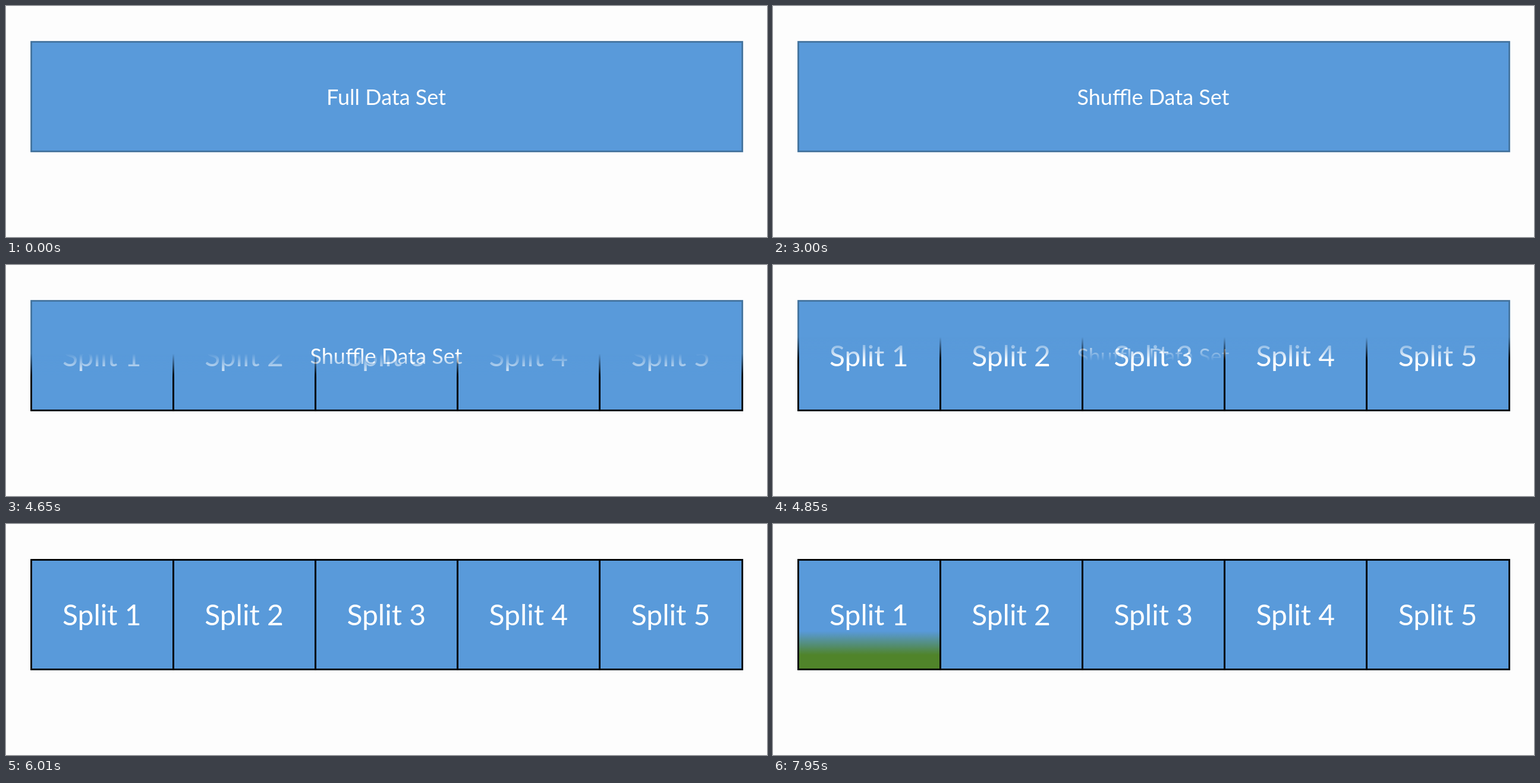
Write an HTML page that moves like this. It is 1280 px wide and 390 px high and loops after 7.99 s.

```html
<!DOCTYPE html>
<html lang="en">
<head>
<meta charset="utf-8">
<title>Splitting a data set</title>
<style>
  html, body { margin: 0; width: 100%; height: 100%; overflow: hidden; background: #fdfdfd; }
  svg { display: block; width: 100%; height: 100%; }
  text { font-family: Lato, "Open Sans", sans-serif; fill: #fff; text-anchor: middle; }
</style>
</head>
<body>
<svg viewBox="0 0 1280 390">
  <defs>
    <linearGradient id="splitFade" gradientUnits="userSpaceOnUse" x1="0" x2="0">
      <stop offset="0" stop-color="#000"/><stop offset="1" stop-color="#fff"/>
    </linearGradient>
    <linearGradient id="greenFade" gradientUnits="userSpaceOnUse" x1="0" x2="0">
      <stop offset="0" stop-color="#000"/><stop offset="1" stop-color="#fff"/>
    </linearGradient>
    <mask id="splitMask" maskUnits="userSpaceOnUse" x="0" y="0" width="1280" height="390">
      <rect width="1280" height="390" fill="url(#splitFade)"/>
    </mask>
    <mask id="greenMask" maskUnits="userSpaceOnUse" x="0" y="0" width="1280" height="390">
      <rect width="1280" height="390" fill="url(#greenFade)"/>
    </mask>
  </defs>
  <rect x="42.5" y="60.5" width="1196" height="185" fill="#599ada" stroke="#41719c" stroke-width="2.7"/>
  <text id="title" x="639.5" y="166.5" font-size="36"></text>
  <g id="splits" mask="url(#splitMask)">
    <rect x="42.5" y="60.5" width="1196" height="185" fill="#599ada"/>
    <rect x="42.5" y="60.5" width="239" height="185" fill="#50842a" mask="url(#greenMask)"/>
  </g>
</svg>
<script>
const LOOP = 7990;
const TOP = 59, BOTTOM = 247, SOFT = 40;
const SHUFFLE_AT = 2040;
const splitWipe = { id: "splitFade", start: 3960, length: 1620 };
const greenWipe = { id: "greenFade", start: 7560, length: 1350 };

const byId = id => document.getElementById(id);

function add(parent, tag, attrs, content = "") {
  const node = document.createElementNS("http://www.w3.org/2000/svg", tag);
  for (const key in attrs) node.setAttribute(key, attrs[key]);
  node.textContent = content;
  parent.append(node);
}

function buildSplits() {
  const group = byId("splits");
  const edge = i => Math.floor(42 + 239.2 * i) + 0.5;
  for (let i = 0; i < 5; i++) {
    add(group, "rect", {
      x: edge(i), y: 60.5, width: edge(i + 1) - edge(i), height: 185,
      fill: "none", stroke: "#000", "stroke-width": 2.8
    });
    add(group, "text", { x: 161.3 + 239.2 * i, y: 171, "font-size": 48 }, `Split ${i + 1}`);
  }
}

// Reveals upwards, with a soft band at the moving edge.
function wipe({ id, start, length }, time) {
  const progress = Math.min(1, Math.max(0, (time - start) / length));
  const front = BOTTOM - progress * (BOTTOM - TOP + SOFT);
  byId(id).setAttribute("y1", front);
  byId(id).setAttribute("y2", front + SOFT);
}

function draw(time) {
  byId("title").textContent = time < SHUFFLE_AT ? "Full Data Set" : "Shuffle Data Set";
  wipe(splitWipe, time);
  wipe(greenWipe, time);
}

function tick() {
  draw(performance.now() % LOOP);
  requestAnimationFrame(tick);
}

buildSplits();
tick();
</script>
</body>
</html>
```
